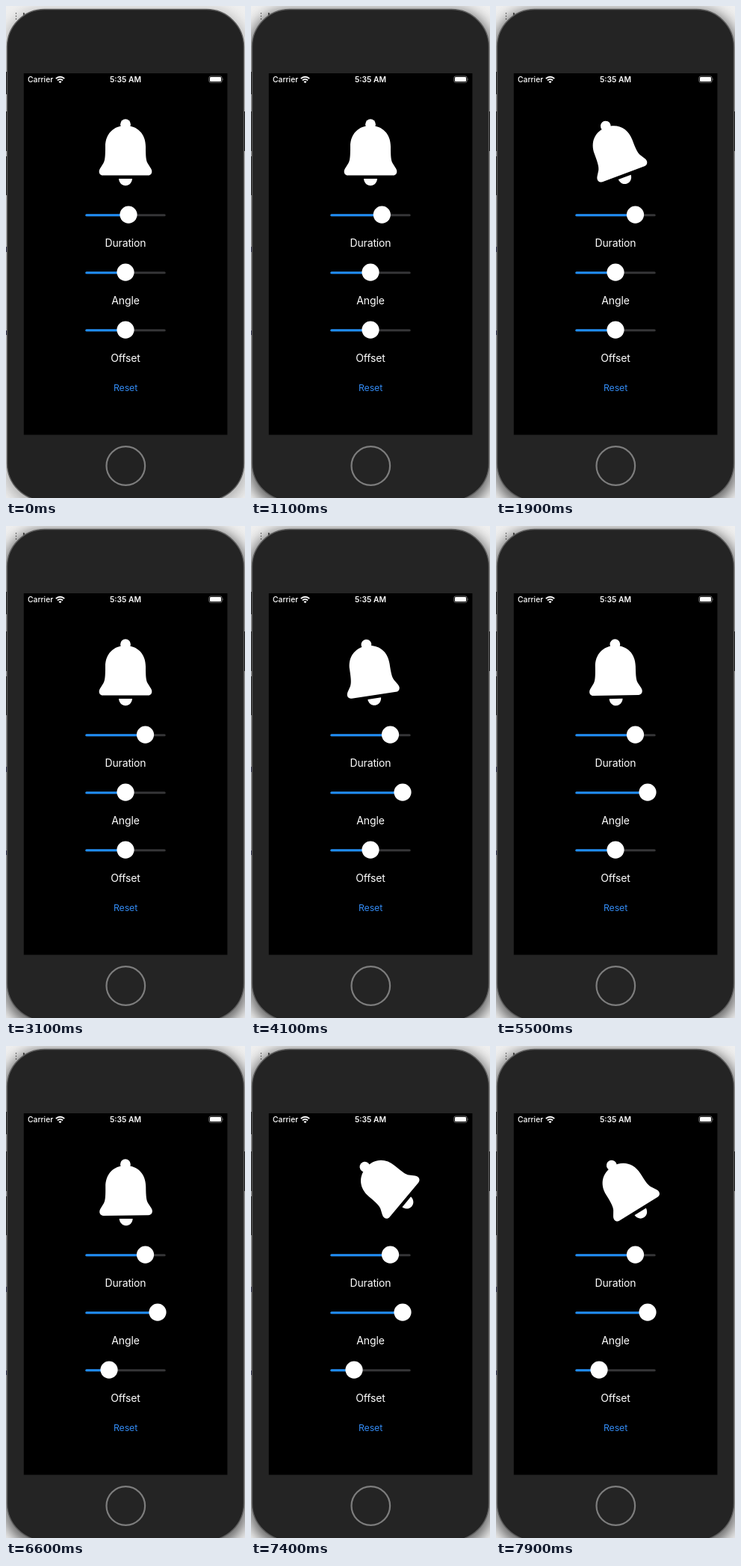
An HTML page for the animation above (8 s loop, 320 by 658 pixels).

```html
<!DOCTYPE html>
<html lang="en">
<head>
<meta charset="utf-8">
<title>Bell animation</title>
<style>
  html, body { margin: 0; width: 100%; height: 100%; overflow: hidden; background: #eee; }
  svg { display: block; width: 100vw; height: 100vh; }
  text { font-family: Inter, Roboto, sans-serif; fill: #fff; }
  .mid { text-anchor: middle; }
  .label { font-size: 14px; letter-spacing: -.15px; }
  .status { font-size: 10.3px; }
</style>
</head>
<body>
<svg viewBox="0 0 320 658" xmlns="http://www.w3.org/2000/svg">
  <defs>
    <filter id="blur" x="-20%" y="-20%" width="140%" height="140%"><feGaussianBlur stdDeviation="9"/></filter>
  </defs>
  <rect width="320" height="658" fill="#efefef"/>
  <text x="8" y="17" font-size="11" style="fill:#444">⋮ M</text>
  <rect id="shadow" x="-2" y="6" width="324" height="664" rx="50" filter="url(#blur)"/>
  <path d="M0 322h1v7h-1zM0 434h1v6h-1z" fill="#224"/>
  <path d="M0 88h2v30h-2zM0 141h2v53h-2zM0 201h2v52h-2zM318 141h2v53h-2z" fill="#0c0c0c"/>
  <rect id="body" x="1.5" y="4.5" width="317" height="657" rx="50" stroke="#5c5c5c" stroke-width="1.4"/>
  <rect x="23.8" y="90" width="272.6" height="483.5"/>
  <circle cx="160.3" cy="615" r="25.8" fill="none" stroke="#7d7d7d" stroke-width="2.2"/>

  <text class="status" x="29" y="102" font-weight="500">Carrier</text>
  <text class="status mid" x="160" y="102" font-weight="600">5:35 AM</text>
  <g fill="none" stroke="#fff" stroke-width="1.9">
    <path d="M66.8 97.1a8.1 8.1 0 0 1 11.4 0M69 99.5a5 5 0 0 1 7 0"/>
    <path d="M72.5 103.2l-2-2a2.8 2.8 0 0 1 4 0z" fill="#fff" stroke="none"/>
  </g>
  <rect x="271.8" y="93.9" width="17.4" height="8.4" rx="2.3" fill="none" stroke="#8a8a8a" stroke-width=".8"/>
  <rect x="273" y="95.1" width="15" height="6" rx="1.3" fill="#fff"/>
  <path d="M290.3 96.6q1.4 1.5 0 3z" fill="#8a8a8a"/>

  <g id="bell" fill="#fff">
    <circle cx="160" cy="158.2" r="6.9"/>
    <path d="M160 160C176 160 187 171 187 188C187 202 187.6 206.5 189.6 210.3L194 217.2C197 222 194.600 226.600 190 226.600H130C125.400 226.600 123 222 126 217.200L130.400 210.300C132.400 206.500 133 202 133 188C133 171 144 160 160 160Z"/>
    <path d="M151 231H169C168.600 236.500 164.800 240.200 160 240.200S151.400 236.500 151 231Z"/>
  </g>
  <g id="sliders"></g>
  <text class="mid" x="160" y="515" font-size="12.35" letter-spacing="-.1" style="fill:#338bf3">Reset</text>
</svg>
<script>
const LOOP = 8000, SWING = 1700, HALF_TURNS = 5;
const $ = id => document.getElementById(id);
const clamp = v => Math.min(1, Math.max(0, v));
const ease = u => u < .5 ? 4 * u ** 3 : 1 - 4 * (1 - u) ** 3;
const smooth = u => u * u * (3 - 2 * u);

// Each slider is dragged once, then the bell rings.
const sliders = [
  { name: 'Duration', y: 279, from: 164, to: 186.5, drag: 850 },
  { name: 'Angle', y: 356, from: 160, to: 203, drag: 3330 },
  { name: 'Offset', y: 433, from: 160, to: 138, drag: 5930 }
];
const rings = [
  { start: 1430, angle: 21, pivot: 196 },
  { start: 3899, angle: 81, pivot: 196 },
  { start: 6517, angle: 81, pivot: 168 }
];

function add(parent, tag, attrs) {
  const el = document.createElementNS('http://www.w3.org/2000/svg', tag);
  for (const key in attrs) el.setAttribute(key, attrs[key]);
  return parent.appendChild(el);
}

for (const s of sliders) {
  const g = $('sliders'), bar = { x: 106.3, y: s.y - .7, height: 3, rx: 1.5 };
  add(g, 'rect', { ...bar, width: 107.4, fill: '#353537' });
  s.fill = add(g, 'rect', { ...bar, fill: '#1e8cf6' });
  s.knob = add(g, 'circle', { cy: s.y + .1, r: 11.6, fill: '#fff' });
  add(g, 'text', { x: 160, y: s.y + 43.3, class: 'mid label' }).textContent = s.name;
}

function draw(t) {
  for (const s of sliders) {
    const x = s.from + (s.to - s.from) * smooth(clamp((t - s.drag) / 500));
    s.knob.setAttribute('cx', x);
    s.fill.setAttribute('width', x - 106.3);
  }
  let angle = 0, pivot = 196;
  for (const r of rings) {
    const u = (t - r.start) / SWING;
    if (u > 0 && u < 1) {
      angle = -r.angle * Math.sin(HALF_TURNS * Math.PI * ease(u));
      pivot = r.pivot;
    }
  }
  $('bell').setAttribute('transform', `rotate(${angle} 160 ${pivot})`);
  const active = t >= 900;
  $('shadow').setAttribute('opacity', active ? .6 : .25);
  $('body').setAttribute('fill', active ? '#242424' : '#222');
}

const begin = performance.now();
function tick() {
  draw((performance.now() - begin) % LOOP);
  requestAnimationFrame(tick);
}
tick();
</script>
</body>
</html>
```
